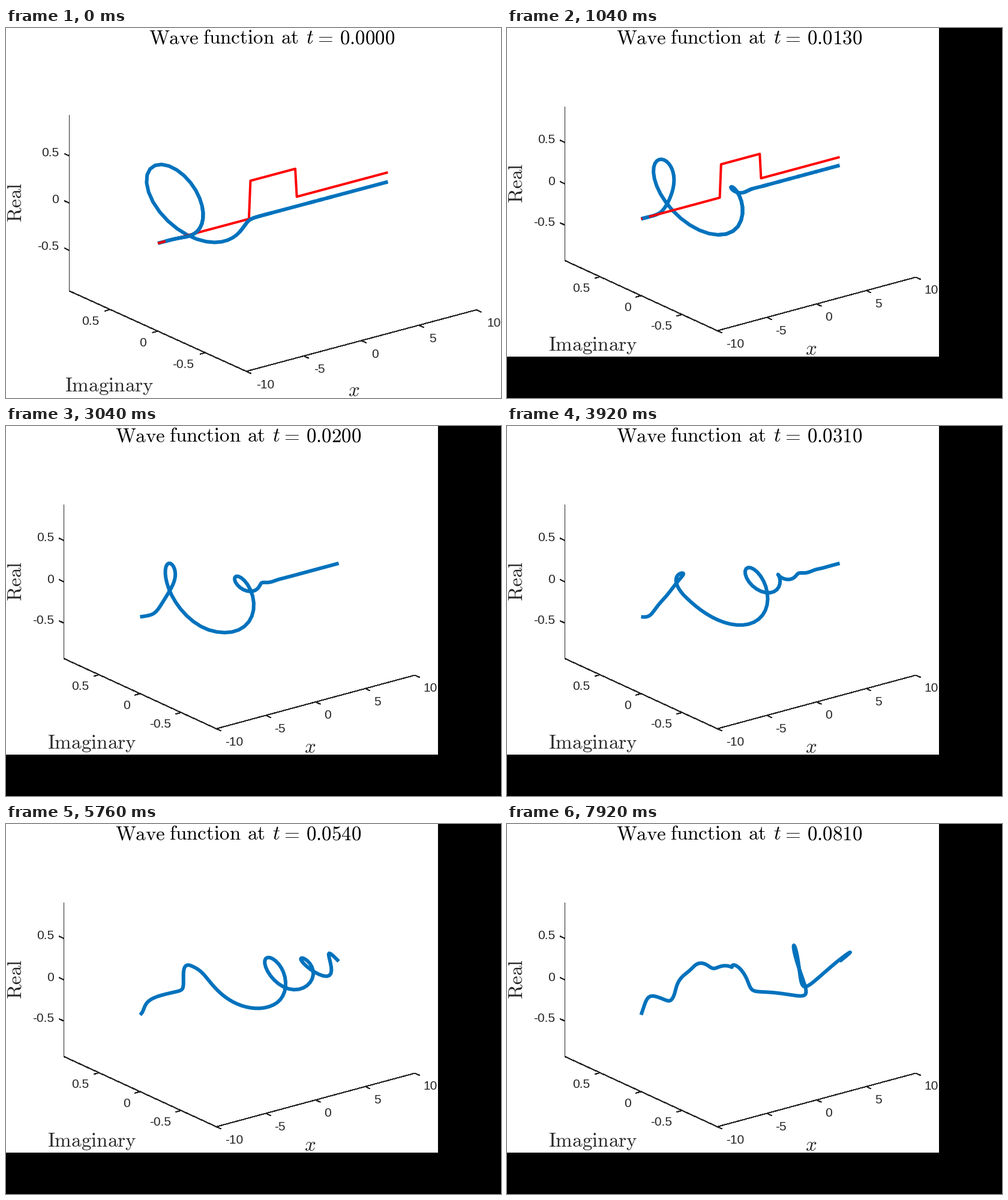
Write a matplotlib script that moves like this. It is 825 px wide and 617 px high and loops after 8000 ms.

```python
import numpy as np
import matplotlib.pyplot as plt
from matplotlib.animation import FuncAnimation
from matplotlib.patches import Rectangle

W, H, DPI = 825, 617, 100
FRAMES, INTERVAL = 100, 80
RESTART = 18            # the run starts over here, without the potential drawn
LIMIT = 0.93            # half range of the real and imaginary axes
TAU = 0.1               # evolution time per frame
INK, BLUE, RED = "#262626", "#0072BD", "#FF0000"
PX = 72 / DPI

plt.rcParams["mathtext.fontset"] = "cm"
plt.rcParams["font.family"] = "Liberation Sans"

# Wave packet in a box with hard walls, a barrier and a step.
x = np.linspace(-10, 10, 150)
dx = x[1] - x[0]
potential = np.where(np.abs(x) < 2, 0.4, np.where(x >= 2, 0.1, 0.0))
packet = np.pi ** -0.25 * np.exp(-(x + 5) ** 2 / 2 + 1j * x)
hop = np.full(x.size - 3, -0.5 / dx ** 2)
hamiltonian = (np.diag(1 / dx ** 2 + potential[1:-1])
               + np.diag(hop, 1) + np.diag(hop, -1))
energy, modes = np.linalg.eigh(hamiltonian)
weights = modes.T @ packet[1:-1]


def wave(steps):
    psi = np.zeros(x.size, complex)
    psi[1:-1] = modes @ (weights * np.exp(-1j * energy * TAU * steps))
    return psi


class View:
    """Orthographic layout of the 3D axes in stage pixels."""

    def __init__(self, size, origin, x_axis, imag_axis, height, title_x,
                 x_label, imag_label, real_label, x_ticks, imag_ticks, real_ticks):
        self.size, self.title_x = size, title_x
        self.origin, self.x_axis = origin, x_axis
        self.imag_axis, self.height = imag_axis, height
        self.labels = x_label, imag_label, real_label
        self.x_ticks, self.imag_ticks, self.real_ticks = x_ticks, imag_ticks, real_ticks

    def project(self, pos, imag, real):
        a = (np.asarray(pos) + 10) / 20
        b = (np.asarray(imag) + LIMIT) / (2 * LIMIT)
        c = (np.asarray(real) + LIMIT) / (2 * LIMIT)
        px = self.origin[0] + a * self.x_axis[0] + b * self.imag_axis[0]
        py = (self.origin[1] + a * self.x_axis[1] + b * self.imag_axis[1]
              - c * self.height)
        return px, py


# Tick label anchors: first position, then the step to the next label.
LARGE = View((825, 617), (400.5, 572.5), (383.5, -102.5), (-295, -134), 293, 238.5,
             (570, 614), (98, 605.5), (25, 324.5),
             (417, 594, 96.2, -25.7), (155, 488, 79, 36), (88, 206.5, 78.5))
SMALL = View((720, 548), (350.5, 504.8), (331, -89.3), (-254, -117), 256, 182.5,
             (497, 545), (69, 538.5), (25, 292.5),
             (365, 526, 82.6, -22.4), (138, 433, 68.5, 31.5), (80, 185.5, 69))

fig = plt.figure(figsize=(W / DPI, H / DPI), dpi=DPI, facecolor="black")
ax = fig.add_axes([0, 0, 1, 1])


def line(px, py, color, width, z, smooth=True):
    ax.plot(px, py, color=color, lw=width * PX, zorder=z, antialiased=smooth,
            solid_capstyle="butt", solid_joinstyle="round")


def roman(px, py, text, color=INK, **style):
    ax.text(px, py, f"${text}$", fontsize=33.1 * PX, color=color,
            va="baseline", **style)


def tick_label(px, py, text, ha):
    ax.text(px, py + 7, text, fontsize=21 * PX, color=INK, ha=ha, va="baseline")


def tick(start, shift):
    line([start[0], start[0] + shift[0]], [start[1], start[1] + shift[1]],
         INK, 1, 1, smooth=False)


def draw_axes(view):
    lo, hi = -LIMIT, LIMIT
    line(*view.project([10, -10, -10, -10], [lo, lo, hi, hi], [lo, lo, lo, hi]),
         INK, 1, 1, smooth=False)
    px, py, step_x, step_y = view.x_ticks
    for i, value in enumerate((-10, -5, 0, 5, 10)):
        tick(view.project(value, lo, lo), (8, 3.7))
        tick_label(px + i * step_x, py + i * step_y, str(value), "left")
    px, py, step_x, step_y = view.imag_ticks
    rx, ry, step_r = view.real_ticks
    for i, value in enumerate((0.5, 0, -0.5)):
        tick(view.project(-10, value, lo), (-9, 2.4))
        tick_label(px + i * step_x, py + i * step_y, str(value), "right")
        tick(view.project(-10, hi, value), (-8, -3.7))
        tick_label(rx, ry + i * step_r, str(value), "right")
    x_label, imag_label, real_label = view.labels
    roman(*x_label, "x")
    roman(*imag_label, r"\mathrm{Imaginary}")
    roman(*real_label, r"\mathrm{Real}", rotation=90, rotation_mode="anchor")


def draw_title(view, step):
    parts = ((0, r"\mathrm{Wave}"), (90, r"\mathrm{function}"),
             (220, r"\mathrm{at}"), (261, "t"), (276, "="),
             (317.5, rf"\mathrm{{{step / 1000:.4f}}}"))
    for offset, text in parts:
        roman(view.title_x + offset, 26.5, text, "black")


def draw(n):
    ax.clear()
    ax.set(xlim=(0, W), ylim=(H, 0))
    ax.axis("off")
    step = n if n < RESTART else n - RESTART
    view = LARGE if step == 0 else SMALL
    ax.add_patch(Rectangle((0, 0), *view.size, facecolor="white", lw=0, zorder=0))
    draw_axes(view)
    draw_title(view, step)

    # The title's clock runs one step ahead of the state.
    psi = wave(max(step - 1, 0))
    px, py = view.project(x, psi.imag, psi.real)
    line(px, py, BLUE, 6, 2)
    if n < RESTART:
        line(*view.project(x, 0 * x, potential), RED, 4, 3)
        # The part nearer to the viewer covers the potential.
        line(np.where(psi.imag < 0, px, np.nan), py, BLUE, 6, 4)
    return []


anim = FuncAnimation(fig, draw, frames=FRAMES, interval=INTERVAL,
                     init_func=lambda: [], repeat=True, repeat_delay=0)
plt.show()
```
